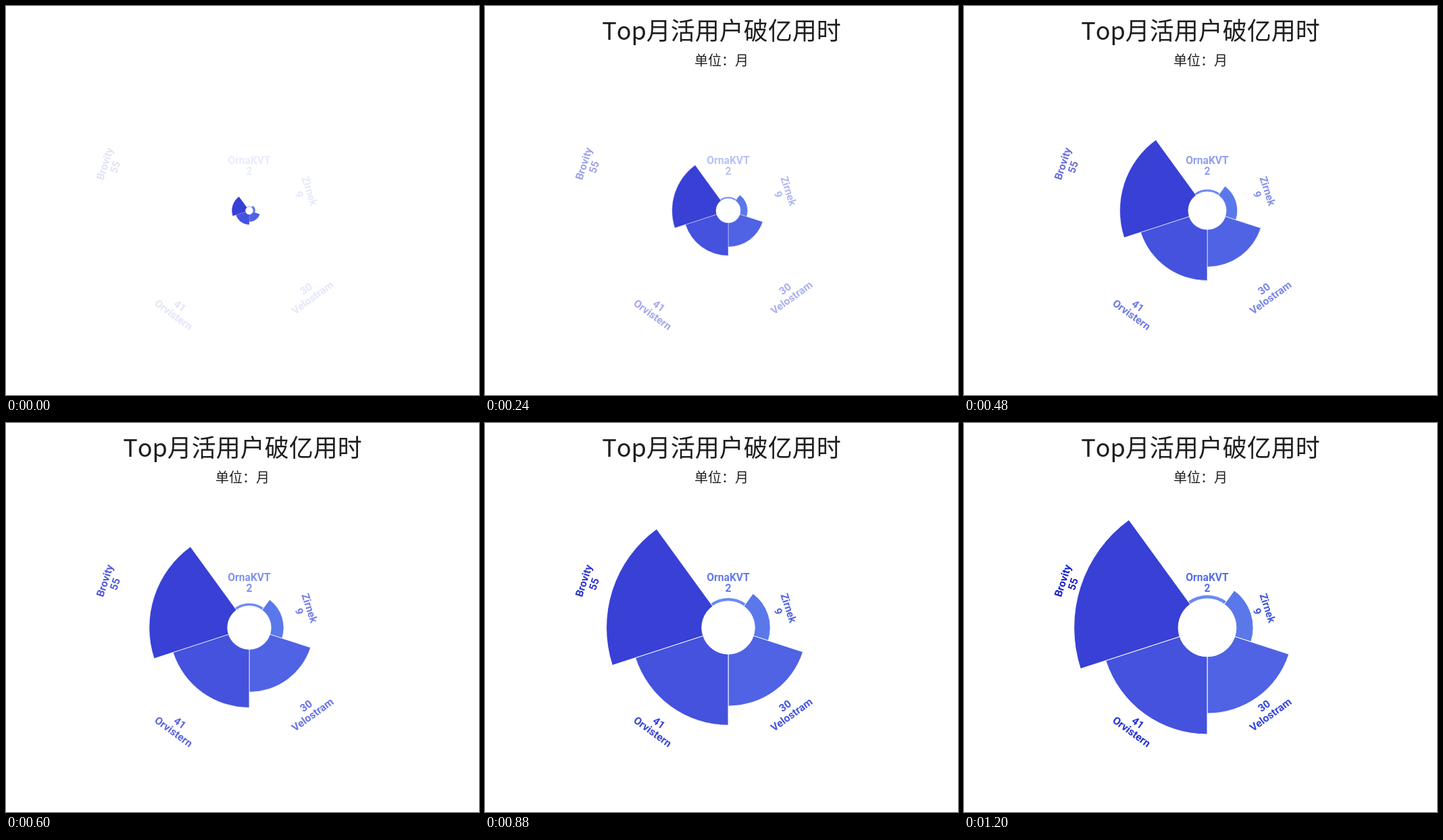
An HTML page for the animation above (3200 ms loop, 700 by 576 pixels).

```html
<!DOCTYPE html>
<html lang="zh-CN">
<head>
<meta charset="utf-8">
<title>月活用户破亿用时</title>
<style>
  html, body { margin: 0; width: 100%; height: 100%; overflow: hidden; background: #fff; }
  svg { display: block; width: 100%; height: 100%; }
  .head text {
    font-family: "Noto Sans CJK SC", "Noto Sans CJK", sans-serif;
    font-kerning: none; fill: #1d1e1f; text-anchor: middle;
  }
  .label { font: 600 15.6px Roboto, sans-serif; text-anchor: middle; }
  .slice { stroke: #fff; stroke-width: 1; stroke-linejoin: round; }
</style>
</head>
<body>
<svg id="stage" viewBox="0 0 700 576">
  <g class="head" id="head">
    <text x="350" y="50" font-size="36">Top月活用户破亿用时</text>
    <text x="350" y="88" font-size="20">单位：月</text>
  </g>
  <g transform="translate(360 303)">
    <g id="rose"></g>
    <g id="labels"></g>
  </g>
</svg>
<script>
const LOOP = 3200, GROW = 1200, STEP = 40;
const INNER = 43, UNIT = 155 / 55, LINE = 16, CAP = 5.6;

// name, value, slice colour, label colour
const apps = [
  ['OrnaKVT', 2, '#6b8af2', '#566de8'],
  ['Zirnek', 9, '#5b78ea', '#4156de'],
  ['Velostram', 30, '#4f63e4', '#3446d9'],
  ['Orvistern', 41, '#4452dd', '#2433d3'],
  ['Brovity', 55, '#3840d5', '#1821cb']
];

const byId = id => document.getElementById(id);
const head = byId('head'), rose = byId('rose'), labels = byId('labels');

function add(parent, tag, attrs, text) {
  const el = document.createElementNS('http://www.w3.org/2000/svg', tag);
  for (const key in attrs) el.setAttribute(key, attrs[key]);
  if (text !== undefined) el.textContent = text;
  parent.appendChild(el);
}

function point(radius, deg) {
  const a = deg * Math.PI / 180;
  return (radius * Math.sin(a)).toFixed(3) + ' ' + (-radius * Math.cos(a)).toFixed(3);
}

function slicePath(outer, from, to) {
  return `M${point(INNER, from)}L${point(outer, from)}` +
    `A${outer} ${outer} 0 0 1 ${point(outer, to)}L${point(INNER, to)}` +
    `A${INNER} ${INNER} 0 0 0 ${point(INNER, from)}Z`;
}

apps.forEach(([name, value, fill, ink], i) => {
  const mid = i * 360 / apps.length, half = 180 / apps.length;
  const outer = INNER + value * UNIT;
  add(rose, 'path', { class: 'slice', d: slicePath(outer, mid - half, mid + half), fill });

  // lower labels are turned over so that they stay readable
  const flip = mid > 90 && mid < 270;
  const near = outer * 1.01 + (flip ? 14.2 : 9);
  const put = (text, radius) => add(labels, 'text', {
    class: 'label', fill: ink, y: (flip ? radius : -radius) + CAP,
    transform: `rotate(${flip ? mid - 180 : mid})`
  }, text);
  put(name, near + LINE);
  put(value, near);
});

function growth(t) {
  return 1 - Math.pow(0.931 - 0.00073 * Math.min(t, GROW), 1.95);
}

function draw(time) {
  const t = Math.floor((time % LOOP) / STEP) * STEP;
  const s = growth(t);
  head.setAttribute('visibility', t < STEP ? 'hidden' : 'visible');
  rose.setAttribute('transform', `scale(${s})`);
  labels.setAttribute('opacity', s);
}

let start;
function tick(now) {
  if (start === undefined) start = now;
  draw(Math.max(0, now - start));
  requestAnimationFrame(tick);
}
draw(0);
requestAnimationFrame(tick);
</script>
</body>
</html>
```
